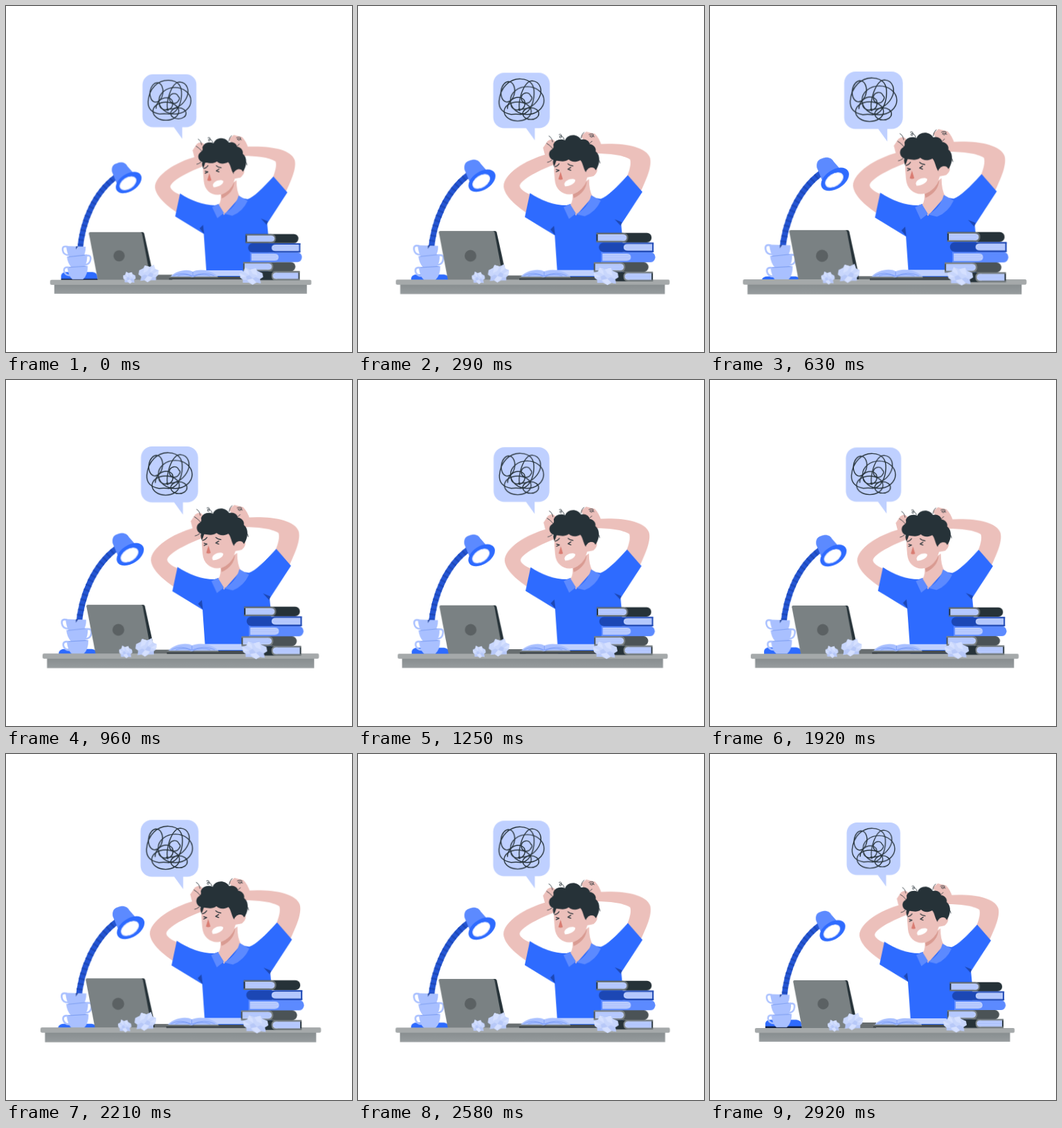
Animation of 500x500 px, one loop 2960 ms. Source, as an HTML page without scripts:

```html
<!DOCTYPE html>
<html lang="en">
<head>
<meta charset="utf-8">
<title>Stressed at the desk</title>
<style>
html, body { margin: 0; width: 100%; height: 100%; overflow: hidden; background: #fff; }
svg { display: block; width: 100vw; height: 100vh; }
.beat { animation: beat 2.96s linear infinite; }
@keyframes beat {
  0%, 100% { transform: scale(1.004); }
  18.5% { transform: scale(1.1); }
  58.4% { transform: scale(1); }
  78.5% { transform: scale(1.1); }
  98.8% { transform: scale(1); }
}
.bubble { transform-origin: 236px 145px; }
.lamp { transform-origin: 138px 311px; }
.cups { transform-origin: 101.5px 371px; }
.person { transform-origin: 316.5px 286px; }
.laptop { transform-origin: 181px 361px; }
.desk { transform-origin: 252.5px 406px; }
.open { transform-origin: 290px 389px; }
.stack { transform-origin: 385px 363px; }
.paper { transform-origin: 270.5px 388px; }
.blue { fill: #2e6bff; }
.mid { fill: #5c8aff; }
.pale { fill: #bfd0ff; }
.deep { fill: #1c47b4; }
.skin { fill: #ecc0bb; }
.ink { fill: #263238; }
.line { fill: none; stroke: #263238; stroke-linecap: round; stroke-linejoin: round; }
</style>
</head>
<body>
<svg viewBox="0 0 500 500">
  <defs>
    <linearGradient id="front" x1="0" x2="0" y1="0" y2="1">
      <stop offset="0" stop-color="#878d8f"/><stop offset="1" stop-color="#979c9e"/>
    </linearGradient>
    <g id="book">
      <path d="M0 0H70a6.5 6.5 0 0 1 0 13H0z" fill="currentColor"/>
      <path d="M0 0H37q7 0 7 6.5t-7 6.5H0v-2H35V2H0z" fill="var(--edge)"/>
      <path d="M2 2H36q6 0 6 4.500t-6 4.500H2z" class="pale"/>
      <path d="M2 4.200H39M2 6.500H41M2 8.800H39" stroke="#98b2fb" stroke-width=".6"/>
    </g>
    <g id="ball">
      <path d="M1 8L7 5 9 1 16 3 22 0 24 6 29 8 28 15 25 18 25 22 18 22 13 25 8 22 3 23 4 17 0 14z" fill="#c8d6fc"/>
      <path d="M9 1L16 3 13 9 7 12zM22 0L24 6 17 11 18 5zM29 8L28 15 21 13zM13 16L20 18 13 25 9 21z" fill="#d5e0ff"/>
      <path d="M4 17L9 14 13 16 8 22 3 23zM17 11L21 13 20 18 13 16zM25 18L25 22 18 22 20 18z" fill="#b7c8f8"/>
    </g>
  </defs>

  <g class="beat bubble">
    <path class="pale" d="M212.500 99H260a15 15 0 0 1 15 15V160a15 15 0 0 1-15 15H254.500V191.500L242.500 175H212.500a15 15 0 0 1-15-15V114a15 15 0 0 1 15-15z"/>
    <g class="line" stroke-width="1.300">
      <ellipse cx="217.500" cy="125" rx="9.300" ry="14" transform="rotate(8 217.500 125)"/>
      <path d="M222 156C210 154 205 148 205.500 138C207 119 220 107 235 107.500C249 108 254 116 253.500 128C253 143 246 155 236 156C232 156 230 155 222 156"/>
      <ellipse cx="244" cy="137" rx="23" ry="19"/>
      <path d="M234 151C230 140 239 110 251 110C262 111 266 123 260 134C254 145 243 150 232 149"/>
      <ellipse cx="231" cy="152" rx="18.500" ry="13"/>
      <ellipse cx="249" cy="155" rx="11" ry="8"/>
      <path d="M249 131C246 124 237 126 236 133C236 141 245 143 249 137Q252 133 249 131M217 148C217 139 225 131 235 133C244 136 242 148 234 150C227 151 221 147 222 141"/>
    </g>
  </g>

  <g class="beat lamp">
    <path class="blue" d="M80 396V389Q81 384 88 384H125Q132 385 132.500 391V396z"/>
    <path d="M80 393.500H133V396H80z" fill="#101c3a"/>
    <g fill="none" stroke-width="8">
      <path d="M159 247C129 269 110 310 107 354" stroke="#2455d3"/>
      <path d="M159 247C129 269 110 310 107 354" stroke="#1d49ba" stroke-dasharray="2.500 4.500"/>
    </g>
    <path class="mid" d="M153 240C152 233 155 229 160 228C166 225 173 227 175 232L183 241 160 257z"/>
    <ellipse class="blue" cx="177" cy="255.500" rx="20.500" ry="12.500" transform="rotate(-33 177 255.500)"/>
    <ellipse cx="176" cy="256.500" rx="13" ry="8" fill="#fff" stroke="#bfd0ff" transform="rotate(-33 176 256.500)"/>
  </g>

  <g class="beat cups">
    <g fill="none" stroke="#a9c0ff" stroke-width="2.400">
      <path d="M89 348Q81 346 82 353Q83 360 91 360"/>
      <path d="M115 361Q123 359 122 366Q121 374 113 374"/>
      <path d="M92 378Q83 376 84 383Q86 390 94 389"/>
    </g>
    <g fill="#a9c0ff">
      <path d="M87 347L115 348Q115 358 111 362L92 363Q88 358 87 347z"/>
      <path d="M88 362L117 359Q118 370 113 377L95 378Q89 372 88 362z"/>
      <path d="M88.500 377L118 375.500Q118 389 111 395H96Q90 390 88.500 377z"/>
    </g>
    <path d="M101 347.500H104L101 352z" fill="#2c4a9c"/>
    <path d="M90 362.500L114 360M91 377.500L116 376" stroke="#7f9ff2" fill="none"/>
  </g>

  <g class="beat person">
    <path class="skin" d="M275 218C245 226 216 245 216 262C217 276 236 291 250 300L256 274C245 271 238 265 238 261C240 252 266 239 288 231z"/>
    <path class="skin" d="M345 204C376 202 411 206 416.500 223C420 236 409 257 403 271L383 253C389 240 391 230 389 225C380 219 361 217 342 217z"/>
    <path class="blue" d="M252 271C267 281 285 288 302 288L337 277 349 279C358 276 370 264 386 246.500L406 269.500 377 314 379 335V394H290.500L286 329 245 304z"/>
    <path class="deep" d="M280 321L285 316 286.500 329zM368 307L378 311 376.500 316z"/>
    <path class="skin" d="M310 268L333 252Q333 268 338 276L315 302 307 288Q312 282 310 268z"/>
    <path d="M311 273Q325 267 330 254Q329 270 312 278z" fill="#d99b92"/>
    <path class="mid" d="M307 286L298 290.500 305.500 306.500 315 299zM336 274L349 281.500Q342 297 327 303L315 300Q331 292 336 274z"/>
    <path class="skin" d="M285 225Q284.500 240 286 253C287 266 296 273 306 273C321 272 328 260 331 248Q341 250 344 241Q345 232 339 225L320 210H290z"/>
    <path class="skin" d="M270 209L276 200Q281 196 285 199L290 204 284 222Q281 230 274 225z"/>
    <path class="skin" d="M322 193L329 187 341 190Q347 196 350 206L347 217Q337 217 333 211z"/>
    <path class="ink" d="M285 235C284 231 283 229 284 226C278 224 276 216 281 212C284 210 285 209 284 205C286 198 294 196 300 199C303 190 317 189 322 198C327 196 333 199 334 204C340 205 343 210 342 214C349 219 348 232 342 240C339 234 331 236 329 243C325 238 325 230 321 226C315 229 309 229 305 225C298 230 291 226 288 227Q287 231 285 235z"/>
    <path class="skin" d="M329 241Q334 234 340 237Q345 242 339 248L329 250z"/>
    <path d="M294 242L291 252Q294 254 297 252z" fill="#d97c72"/>
    <path d="M299 259C300 253 310 250 314 253C315 258 306 262 300 262z" fill="#fff"/>
    <path class="line" stroke-width="1.200" d="M286 235Q289 235 292 231M304 231Q307 234 311 234M288 239L292 240 288 242M308 236L304 238.500 308 240"/>
    <path class="line" stroke-width=".8" d="M275 203Q279 205 284 211M278 193Q282 195 283 201M276 229Q278 229 282 226M292 191Q296 189 295 195Q292 197 293 193Q297 192 299 198M322 196Q323 190 326 188M333 191Q337 189 339 191Q338 197 334 193Q336 191 340 194M334 203L337 200M345 224Q348 227 348 230"/>
  </g>

  <g class="beat laptop">
    <path d="M205 388H240V396H205z" fill="#686e70"/>
    <path class="ink" d="M192 327H197Q199 327 199.500 329L212 386V396H204z"/>
    <path d="M122 327H194Q196 327 196.500 329L209 396H133L120.200 329Q120 327 122 327z" fill="#7a8183"/>
    <circle cx="163.500" cy="361" r="8" fill="#5b6163"/>
  </g>

  <g class="beat desk">
    <rect x="71" y="402" width="362.500" height="13.700" fill="url(#front)"/>
    <rect x="65" y="395.800" width="375" height="7.200" rx="2" fill="#a5a9aa"/>
  </g>

  <g class="beat open">
    <path d="M236 391H346V395.500H236z" fill="#454c50"/>
    <path d="M236 391H268L271 393 274 391H306V392.500H236z" fill="#7a8183"/>
    <path class="pale" d="M270 385Q279 381 290 382H341Q346 386 346 390H300z"/>
    <path d="M238 391C245 383 262 379 270 384C280 379 298 382 306 391H274L270 392 266 391z" fill="#a9c0ff"/>
    <path d="M242 390Q255 383 269 390M248 390Q259 386 269 390.500M301 390Q287 383 271 390M295 390Q284 386 271 390.500M270 384V391" fill="none" stroke="#6f93f5" stroke-width=".7"/>
  </g>

  <g class="beat stack">
    <g color="#263238" style="--edge:#7a8183"><use href="#book" transform="matrix(-.92 0 0 1 424 383)"/></g>
    <g color="#4b5356" style="--edge:#7a8183"><use href="#book" transform="matrix(.98 0 0 1 343 370)"/></g>
    <g color="#5c8aff" style="--edge:#5c8aff"><use href="#book" transform="matrix(.97 0 0 1.070 353 356)"/></g>
    <g color="#1c47b4" style="--edge:#1c47b4"><use href="#book" transform="matrix(-.98 0 0 1 425 343)"/></g>
    <g color="#263238" style="--edge:#687073"><use href="#book" transform="matrix(.99 0 0 1 346.500 329.700)"/></g>
  </g>

  <g class="beat paper">
    <use href="#ball" transform="translate(192 374)"/>
    <use href="#ball" transform="matrix(-.62 0 0 .68 188 384)"/>
    <use href="#ball" transform="matrix(-1.170 0 0 .98 371 378)"/>
  </g>
</svg>
</body>
</html>
```
